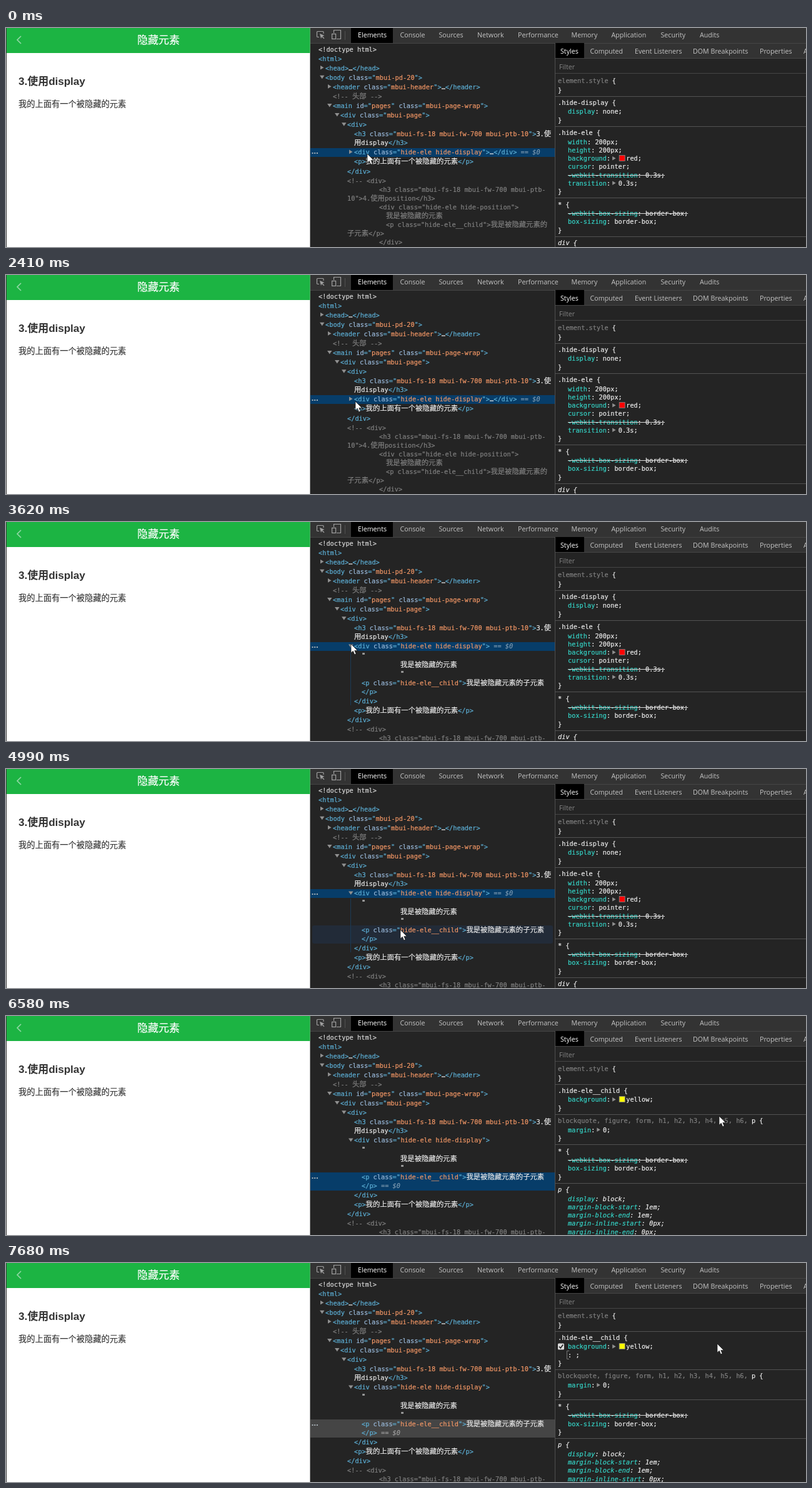
Recreate the animation shown at these times as an HTML page. Size 1280 by 350 pixels, loop 8000 ms.

```html
<!DOCTYPE html>
<html lang="zh">
<head>
<meta charset="utf-8">
<style>
html, body { margin: 0; width: 100%; height: 100%; overflow: hidden; background: #242424; }
svg { display: block; }
text { white-space: pre; }
.mono { font: 10.3px "DejaVu Sans Mono", monospace; }
.mono text { stroke-width: .2px; }
.cjk { font: 11.35px "Noto Sans CJK SC", "Noto Sans CJK", sans-serif; }
.ui { font: 10.7px "Open Sans", sans-serif; }
.page { font-family: "Liberation Sans", "Noto Sans CJK SC", "Noto Sans CJK", sans-serif; }
.it { font-style: italic; }
</style>
</head>
<body>
<svg id="stage" width="1280" height="350" viewBox="0 0 1280 350">
  <rect width="1280" height="350" fill="#242424"/>
  <g class="page">
    <rect width="486.5" height="350" fill="#fff"/>
    <rect width="486.5" height="40" fill="#1cb443"/>
    <rect width="1" height="350" fill="#3a3a3a"/>
    <path d="M24 13L18 19L24 25" fill="none" stroke="#8fd8a3" stroke-width="1.7"/>
    <text x="244" y="25" font-size="17" fill="#fff" stroke="#fff" stroke-width=".2" text-anchor="middle">隐藏元素</text>
    <text x="20" y="91" font-size="17" font-weight="700" fill="#333">3.使用display</text>
    <text x="20" y="126" font-size="13.25" fill="#333" stroke="#333" stroke-width=".15">我的上面有一个被隐藏的元素</text>
  </g>
  <g id="dom" class="mono"></g>
  <g id="css" class="mono"></g>
  <rect x="487" width="793" height="24" fill="#333"/>
  <rect x="878" y="24" width="402" height="25" fill="#333"/>
  <path d="M487 24.5H1280M878 48.5H1280M878 72.5H1280" stroke="#454545"/>
  <path d="M878.5 24V350" stroke="#505050"/>
  <rect x="552" width="67" height="24" fill="#000"/>
  <rect x="879" y="24" width="46" height="24" fill="#000"/>
  <g fill="none" stroke="#a0a0a0" stroke-width="1.2">
    <path d="M501 14.5H498.5Q497.5 14.5 497.5 13.5V6.5Q497.5 5.5 498.5 5.5H507Q508 5.5 508 6.5V9"/>
    <path d="M502 9L509.5 12L506.3 13.2L509.5 16.5L508.5 17.3L505.3 14.2L504 17Z" fill="#a0a0a0" stroke="none"/>
    <path d="M524.5 8V3.5H535.5V17.5H529"/>
    <rect x="521.6" y="9.5" width="6" height="8"/>
    <path d="M542.5 5V19" stroke="#505050" stroke-width="1"/>
  </g>
  <g id="tabs" class="ui"></g>
  <path id="cursor" d="M0 0V14.2L3.3 11.2L5.7 16.8L8.1 15.8L5.8 10.4H10.4Z" fill="#fff" stroke="#111" stroke-width=".7"/>
</svg>
<script>
const LOOP = 8000;
const $ = id => document.getElementById(id);
const WHITE = '#ececec', TAG = '#5db0d7', ATTR = '#9bbbdc', VALUE = '#f29766', DIM = '#808080', PROP = '#35d4c7';
const CHAR = 6.2, ROW = 15.07, WRAP = 14.1;

// time, x, y of the pointer
const path = [
  [0, 578, 201], [500, 557, 202], [620, 535, 202], [770, 476, 201], [920, 440, 198], [1040, 420, 195],
  [1160, 409, 193], [1900, 432, 194], [2020, 486, 198], [2170, 533, 201], [2290, 550, 202], [2410, 559, 202],
  [2530, 568, 201], [2650, 573, 199], [2770, 574, 199], [2920, 573, 199], [3070, 557, 197], [3220, 552, 195],
  [4330, 564, 202], [4450, 590, 222], [4570, 613, 240], [4690, 627, 250], [4840, 629, 255], [4990, 631, 257],
  [6420, 709, 260], [6580, 1141, 160], [6730, 1139, 142], [6850, 1138, 129]
];

const esc = s => s.replace(/&/g, '&amp;').replace(/</g, '&lt;').replace(/>/g, '&gt;');
const span = (s, color) => `<tspan fill="${color}" stroke="${color}">` +
  esc(s).replace(/[\u4e00-\u9fff]+/g, c => `<tspan class="cjk">${c}</tspan>`) + '</tspan>';
const text = (x, mid, body, cls = '') => `<text x="${x}" y="${(mid + 4).toFixed(2)}" class="${cls}">${body}</text>`;
const rect = (x, y, w, h, fill, extra = '') => `<rect x="${x}" y="${y}" width="${w}" height="${h}" fill="${fill}" ${extra}/>`;
const right = (x, y, fill) => `<path d="M${x} ${y - 3.3}V${y + 3.3}L${x + 5.5} ${y}Z" fill="${fill}"/>`;
const down = (x, y, fill) => `<path d="M${x} ${y - 2.5}H${x + 7.5}L${x + 3.75} ${y + 3}Z" fill="${fill}"/>`;

function markup(s) {
  return s.split(/(<[^>]*>)/).map(part => {
    if (part[0] !== '<') return part && span(part, WHITE);
    return part.split(/( [a-z]+(?==")|="|[^"]*(?=">)|(?<=")[^"]+(?="))/).filter(Boolean).map(t =>
      span(t, /^ [a-z]+$/.test(t) ? ATTR : /^[<"=>]/.test(t) ? TAG : VALUE)).join('');
  }).join('');
}

// x, text, arrow, style: w = wrapped line, c = comment, p = plain
const head = [
  [500, '<!doctype html>', '', 'p'],
  [500, '<html>'],
  [511, '<head>…</head>', 'r'],
  [511, '<body class="mbui-pd-20">', 'd'],
  [523, '<header class="mbui-header">…</header>', 'r'],
  [523, '<!-- 头部 -->', '', 'c'],
  [523, '<main id="pages" class="mbui-page-wrap">', 'd'],
  [535, '<div class="mbui-page">', 'd'],
  [546, '<div>', 'd'],
  [557, '<h3 class="mbui-fs-18 mbui-fw-700 mbui-ptb-10">3.使'],
  [557, '用display</h3>', '', 'w']
];
const closed = [[557, '<div class="hide-ele hide-display">…</div>', 'r']];
const opened = [
  [557, '<div class="hide-ele hide-display">', 'd'],
  [569, '"'],
  [631, '我是被隐藏的元素', '', 'w'],
  [631, '"', '', 'w'],
  [569, '<p class="hide-ele__child">我是被隐藏元素的子元素'],
  [569, '</p>', '', 'w'],
  [557, '</div>']
];
const tail = [
  [557, '<p>我的上面有一个被隐藏的元素</p>'],
  [546, '</div>'],
  [546, '<!-- <div>', '', 'c'],
  [597, '<h3 class="mbui-fs-18 mbui-fw-700 mbui-ptb-', '', 'wc'],
  [546, '10">4.使用position</h3>', '', 'wc'],
  [597, '<div class="hide-ele hide-position">', '', 'wc'],
  [608, '我是被隐藏的元素', '', 'wc'],
  [608, '<p class="hide-ele__child">我是被隐藏元素的', '', 'wc'],
  [546, '子元素</p>', '', 'wc'],
  [597, '</div>', '', 'wc']
];

function drawDom({ open, child, blur, hover }) {
  let out = '';
  const fill = blur ? '#454545' : '#073d69';
  if (child) out += rect(487, 250, 391, 29, fill);
  else out += rect(487, 192, 391, 14, fill);
  if (hover === 'text') out += rect(490, 207, 385, 43, '#222b38', 'rx="3"');
  if (hover === 'child') out += rect(490, 250, 385, 29, '#222b38', 'rx="3"');
  if (open && !child) out += rect(551, 207, 1, 86, '#1c3a55');
  const dotY = child ? 259 : 200;
  for (let i = 0; i < 3; i++) out += rect(489.5 + i * 3.7, dotY - 1, 2, 2, '#a8b0b6');

  let y = 33.6 - ROW;
  const mark = child ? '</p>' : 'hide-display';
  const rows = [...head, ...(open ? opened : closed), ...tail];
  rows.forEach(([x, s, arrow, style = '']) => {
    y += style.includes('w') ? WRAP : ROW;
    let body = style.includes('c') ? span(s, DIM) : style === 'p' ? span(s, '#d8d8d8') : markup(s);
    const selected = child ? s === mark : s.includes(mark);
    if (selected) body += '<tspan class="it" fill="#fff" fill-opacity=".55"> == $0</tspan>';
    out += text(x, y, body);
    if (arrow === 'r') out += right(x - 8, y - .5, '#909090');
    if (arrow === 'd') out += down(x - 9, y - .5, '#909090');
  });
  $('dom').innerHTML = out;
}

// selector, properties, class; a property is name, value, mark (a = arrow, s = struck, colour = swatch)
const box = ['* {', [['-webkit-box-sizing', 'border-box', 's'], ['box-sizing', 'border-box']]];
const divRules = [
  ['.hide-display {', [['display', 'none']]],
  ['.hide-ele {', [
    ['width', '200px'], ['height', '200px'], ['background', 'red', '#f00'], ['cursor', 'pointer'],
    ['-webkit-transition', '0.3s', 's'], ['transition', '0.3s', 'a']
  ]],
  box,
  ['div {', [['display', 'block']], 'it']
];
const childRules = [
  ['.hide-ele__child {', [['background', 'yellow', '#ff0']]],
  ['blockquote, figure, form, h1, h2, h3, h4, h5, h6, |p {', [['margin', '0', 'a']]],
  box,
  ['p {', [
    ['display', 'block'], ['margin-block-start', '1em'], ['margin-block-end', '1em'],
    ['margin-inline-start', '0px'], ['margin-inline-end', '0px']
  ], 'it']
];

function property(y, [name, value, mark = ''], cls) {
  const x = 899, end = x + (name.length + 1) * CHAR;
  const label = span(name, PROP) + span(':', WHITE);
  if (!mark || mark === 's') {
    let out = text(x, y, label + span(` ${value};`, WHITE), cls);
    if (mark) out += rect(x, Math.round(y), (name.length + value.length + 3) * CHAR, 1, '#d8d8d8');
    return out;
  }
  let out = text(x, y, label, cls) + right(end + 3, y, '#909090');
  let vx = end + 12.5;
  if (mark[0] === '#') {
    out += rect(vx + 1.5, Math.round(y) - 4.5, 9, 9, mark, 'stroke="#888" stroke-width=".8"');
    vx += 12.5;
  }
  return out + text(vx, y, span(`${value};`, WHITE), cls);
}

function drawCss({ child, check, edit, caret }) {
  let y = 84;
  let out = text(883, y, span('element.style', DIM) + span(' {', WHITE));
  const close = () => {
    out += text(883, y, span('}', WHITE)) + rect(879, Math.round(y + 10), 401, 1, '#525252');
    y += 20.2;
  };
  y += 14.5;
  close();
  (child ? childRules : divRules).forEach(([sel, props, cls], n) => {
    const parts = sel.split('|');
    const own = parts.pop();
    out += text(883, y, (parts[0] ? span(parts[0], DIM) : '') + span(own, WHITE), cls);
    y += 14.7;
    props.forEach((p, i) => {
      if (i) y += 13.2;
      out += property(y, p, cls);
    });
    if (n === 0 && check) {
      out += rect(883, 128.5, 10, 10, '#dcdcdc', 'rx="1.5"') +
        '<path d="M885 133.5L887.3 136L891.3 130.5" fill="none" stroke="#222" stroke-width="1.7"/>';
    }
    if (n === 0 && edit) {
      y += 13.2;
      out += '<path d="M901 140.5H897.5V153.5H901" fill="none" stroke="#777"/>' +
        text(899, y, span(': ;', WHITE));
      if (caret) out += rect(899, 140, 1, 13, '#fff');
    }
    y += 13.5;
    close();
  });
  $('css').innerHTML = out;
}

const tabs = [
  [563, 'Elements'], [630.5, 'Console'], [692.5, 'Sources'], [754, 'Network'], [819, 'Performance'],
  [904.5, 'Memory'], [968.5, 'Application'], [1047.5, 'Security'], [1110, 'Audits']
];
const subTabs = [
  [887, 'Styles'], [934.5, 'Computed'], [1006, 'Event Listeners'], [1099, 'DOM Breakpoints'],
  [1206, 'Properties'], [1276, 'Accessibility']
];
const label = (y, list) => list.map(([x, s], i) =>
  `<text x="${x}" y="${y}" fill="${i ? '#c4c4c4' : '#fff'}">${s}</text>`).join('');
$('tabs').innerHTML = label(15, tabs) + label(41, subTabs) + '<text x="885" y="66" fill="#858585">Filter</text>';

let last = '';
function render(t) {
  const [, x, y] = path.filter(p => p[0] <= t).pop();
  $('cursor').setAttribute('transform', `translate(${x} ${y})`);
  const open = t >= 3620, child = t >= 5420;
  const hover = !open || child || y < 207 ? '' : y < 250 ? 'text' : 'child';
  const state = {
    open, child, hover,
    blur: t >= 6970,
    check: t >= 6730,
    edit: t >= 7090,
    caret: t < 7680
  };
  const key = JSON.stringify(state);
  if (key === last) return;
  last = key;
  drawDom(state);
  drawCss(state);
}

const start = performance.now();
function tick() {
  render((performance.now() - start) % LOOP);
  requestAnimationFrame(tick);
}
tick();
</script>
</body>
</html>
```
